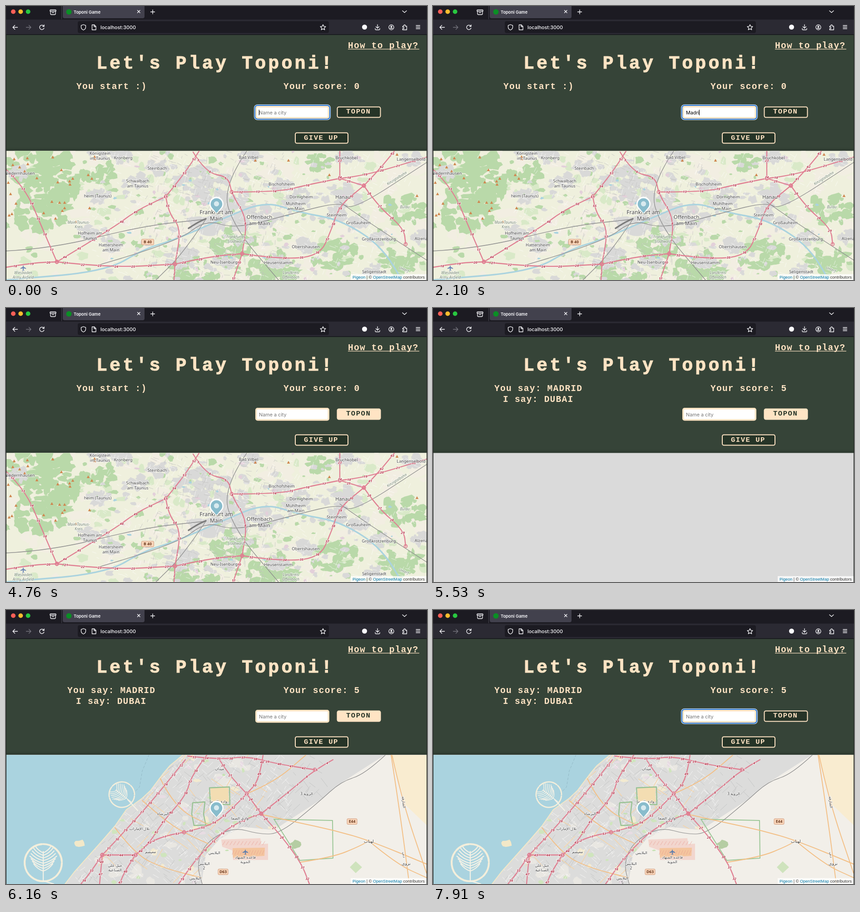
Recreate the animation shown at these times as an HTML page. Size 927 by 604 pixels, loop 8 s.

```html
<!DOCTYPE html>
<html lang="en">
<head>
<meta charset="utf-8">
<title>Toponi Game</title>
<style>
html, body { margin: 0; width: 100%; height: 100%; overflow: hidden; background: #1c1b22; }
svg { display: block; width: 927px; height: 604px; }
.px { font-family: "Liberation Mono", monospace; font-weight: 700; fill: #ffe4c4; white-space: pre; }
.p1 { font-size: 40px; letter-spacing: 5.1px; stroke: #ffe4c4; stroke-width: 1px; }
.p2 { font-size: 19.5px; letter-spacing: 1.25px; }
.p3 { font-size: 15.5px; letter-spacing: 1.55px; }
.ui { font-family: Inter, sans-serif; }
.lb { font-family: "Noto Sans", "DejaVu Sans", sans-serif; text-anchor: middle; fill: #444; stroke: #fff; stroke-opacity: .65; stroke-width: 2px; paint-order: stroke; }
.it { font-style: italic; fill: #70806d; }
.no { font-size: 7.8px; font-weight: 600; font-style: italic; fill: #b93a50; }
.ic { fill: none; stroke: #fbfbfe; stroke-width: 1.3; stroke-linecap: round; stroke-linejoin: round; }
.rd { fill: none; stroke-linejoin: round; stroke-linecap: round; }
</style>
</head>
<body>
<svg id="stage" viewBox="0 0 927 604"></svg>
<script>
const CREAM = [255, 228, 196], DARK = [38, 52, 39];
const PINK = '#e07f92', GREY = '#d9d9d8', GREEN = '#b9d9a9', SEA = '#aad3df';

let seed = 7;
const rnd = () => {
  seed = (seed + 0x6D2B79F5) | 0;
  let a = Math.imul(seed ^ (seed >>> 15), 1 | seed);
  a = (a + Math.imul(a ^ (a >>> 7), 61 | a)) ^ a;
  return ((a ^ (a >>> 14)) >>> 0) / 4294967296;
};
const span = (a, b) => a + rnd() * (b - a);
const times = (n, f) => Array.from({ length: n }, (_, i) => f(i)).join('');
const points = s => s.split(' ').map(p => p.split(',').map(Number));

// Smooth path through the midpoints of a polyline
function curve(p) {
  const last = p.length - 1;
  let d = 'M' + p[0];
  for (let i = 1; i < last; i++)
    d += `Q${p[i]} ${(p[i][0] + p[i + 1][0]) / 2},${(p[i][1] + p[i + 1][1]) / 2}`;
  return d + 'L' + p[last];
}
const line = (d, color, w, more = '') => `<path class="rd" d="${d}" stroke="${color}" stroke-width="${w}" ${more}/>`;
const way = (s, color, w) => line(curve(points(s)), color, w);
const motorways = list => list.map(s => {
  const p = points(s);
  const ends = [p[0], p[p.length - 1]].filter(([x, y]) => x > 0 && x < 926 && y > 330 && y < 600);
  return line(curve(p), PINK, 2.3, 'data-motorway=""')
    + ends.map(([x, y]) => `<circle cx="${x}" cy="${y}" r="3.5" fill="none" stroke="${PINK}" stroke-width="1.8"/>`).join('');
}).join('');

// Winding road that starts anywhere and drifts along its heading
function wander(steps, step) {
  let x = span(0, 927), y = span(320, 604), a = span(0, Math.PI * 2);
  return curve(Array.from({ length: steps }, () => {
    a += span(-.55, .55);
    return [(x += Math.cos(a) * step).toFixed(1), (y += Math.sin(a) * step).toFixed(1)];
  }));
}
const blob = (x, y, rx, ry, color) => {
  const n = 11;
  const p = Array.from({ length: n }, (_, i) => {
    const a = i / n * Math.PI * 2, r = span(.6, 1.2);
    return (x + Math.cos(a) * rx * r).toFixed(1) + ',' + (y + Math.sin(a) * ry * r).toFixed(1);
  });
  return `<polygon points="${p.join(' ')}" fill="${color}"/>`;
};
// Ragged patch built from small blobs around a centre
const patch = (x, y, r, color) => times(8 + r * .4, () => {
  const a = span(0, Math.PI * 2), d = r * Math.sqrt(rnd()) * .9;
  return blob(x + Math.cos(a) * d, y + Math.sin(a) * d * .65, span(4, 6 + r * .2), span(4, 5 + r * .14), color);
});
const scatter = (n, size, color, x0 = 0, x1 = 927) =>
  times(n, () => blob(span(x0, x1), span(320, 604), span(size / 3, size), span(size / 4, size * .7), color));
const streets = (n, x0, x1, len, tilt) => times(n, () => {
  const a = tilt + (rnd() < .5 ? Math.PI / 2 : 0) + span(-.25, .25), l = span(len / 3, len);
  return `M${span(x0, x1).toFixed(1)},${span(320, 604).toFixed(1)}l${(Math.cos(a) * l).toFixed(1)},${(Math.sin(a) * l).toFixed(1)}`;
});
const label = ([x, y, text, size = 9.2, cls = '', turn = 0]) => text.split('/').map((row, i) =>
  `<text class="lb ${cls}" x="${x}" y="${y + i * size * 1.2}" font-size="${size}" transform="rotate(${turn} ${x} ${y})">${row}</text>`).join('');
const shield = (x, y, w, text) => `<rect x="${x - w / 2}" y="${y - 6}" width="${w}" height="12.5" rx="2" fill="#f8d5b9" stroke="#c98c6c" stroke-width=".8"/>
  <text x="${x}" y="${y + 3.4}" font-family="Noto Sans, sans-serif" font-weight="600" font-size="8.6" text-anchor="middle" fill="#6e3c22">${text}</text>`;
const plane = (x, y, color) => `<path d="M${x},${y - 6}l1.2,4 5,3v1.4l-5,-1.2 -.4,3.4 1.5,1.2v.8l-2.3,-.5 -2.3,.5v-.8l1.5,-1.2 -.4,-3.4 -5,1.2v-1.4l5,-3z" fill="${color}"/>`;

function frankfurt() {
  const towns = [
    [207, 328, 'Königstein/im Taunus'], [258, 338, 'Kronberg'], [333, 361, 'Steinbach'], [534, 337, 'Bad Vilbel'],
    [750, 338, 'Bruchköbel'], [892, 341, 'Langenselbold'], [30, 372, 'Niedernhausen'], [290, 389, 'Schwalbach/am Taunus'],
    [202, 422, 'heim (Taunus)'], [185, 504, 'Hofheim am/Taunus'], [231, 530, 'Hattersheim/am Main'], [607, 396, 'Bischofsheim'],
    [650, 424, 'Dörnigheim'], [638, 439, 'Mühlheim/am-Main'], [728, 464, 'Steinheim'], [776, 481, 'Großauheim'],
    [821, 517, 'Großkrotzenburg'], [917, 516, 'Alzenau'], [660, 534, 'Obertshausen'], [600, 569, 'Heusenstamm'],
    [480, 568, 'Neu-Isenburg'], [811, 589, 'Seligenstadt'], [742, 425, 'Hanau', 10.8], [558, 469, 'Offenbach/am Main', 11.5],
    [463, 459, 'Frankfurt am/Main', 12]
  ];
  const regions = [
    [160, 480, 'Main-Taunus-/Kreis'], [878, 446, 'Bulau'], [506, 512, 'Frankfurter/Stadtwald'],
    [627, 591, 'Landkreis/Offenbach'], [38, 591, 'Wiesbaden/Army Airfield'],
    [862, 382, 'Kinzigtalbahn', -32], [875, 583, 'Unterf', 22]
  ];
  const reach = size => size > 11.5 ? 85 : size > 10 ? 46 : 25;
  return `<rect y="319" width="927" height="285" fill="#eff0dd"/>`
    + scatter(130, 24, '#f2eee2') + scatter(70, 18, '#d9e9c8')
    + points('70,350,80 95,400,85 70,455,70 195,365,45 410,585,55 505,525,58 585,585,65 720,548,55 870,450,56 870,560,55 690,345,30')
      .map(p => patch(...p, GREEN)).join('')
    + scatter(75, 13, GREEN)
    + towns.map(([x, y, , size]) => patch(x, y - 5, reach(size), GREY)).join('')
    + patch(430, 390, 65, GREY) + patch(390, 553, 38, GREY)
    + scatter(110, 11, GREY, 210, 800) + scatter(45, 7, GREEN, 230, 800) + scatter(24, 8, '#e3d0da', 230, 800)
    + line(streets(650, 180, 900, 14, .4), '#fff', .8, 'opacity=".75"')
    + line(streets(330, 300, 620, 14, .3), '#c0c0bf', .7)
    + line(times(34, () => wander(8, 22)), '#c1c0bb', .7)
    + way('870,604 840,540 742,472 645,455 570,430 475,470 370,516 305,535 220,585 0,604', SEA, 3.3)
    + scatter(14, 6, SEA, 200, 850)
    + line(times(42, () => wander(7, 20)), '#f5c692', 1.4)
    + ['200,572 375,522 440,470 505,492 640,455 735,432 765,450 926,345', '0,540 100,535 300,485 440,470', '735,432 800,478 926,560', '530,320 475,400 505,492 600,604', '440,470 390,545 330,604']
      .map(s => way(s, '#8d8d8d', 1.3)).join('')
    + way('402,490 420,478 440,469', '#7c7c7c', 3.5)
    + motorways([
      '0,360 42,400 80,490 112,564', '0,576 60,566 112,564', '112,564 230,577 372,569',
      '372,569 450,552 520,546', '520,546 600,558 690,552 716,495 734,440 788,396', '788,396 818,365 855,320',
      '112,564 235,490 285,452 352,420', '425,320 400,360 352,420', '352,420 357,455 386,490 372,569', '372,569 370,604',
      '412,322 440,368 490,376 497,415 532,470 520,546', '520,546 500,604', '497,410 600,410 660,395 735,380',
      '735,380 788,375 926,333', '735,320 735,380', '735,380 788,396', '788,396 818,440 876,490 880,525'
    ])
    + times(36, i => `<path d="M${span(4, i < 28 ? 200 : 920).toFixed()},${span(324, 475).toFixed()}l3.3,6h-6.6z" fill="#cf8750"/>`)
    + '<g class="numbers"></g>' + shield(312, 520, 27, 'B 40') + towns.map(label).join('')
    + regions.map(([x, y, text, turn]) => label([x, y, text, 8.2, 'it', turn])).join('')
    + plane(38, 577, '#6c87b5');
}

function palm(x, y, r, turn) {
  let d = `M0,${r}V${-r * .6}`;
  for (let i = 0; i < 8; i++) {
    const v = r * (.45 - i * .14), w = r * (.72 - Math.abs(i - 3) * .07);
    for (const k of [w, -w]) d += `M0,${v}Q${k * .6},${v - r * .1} ${k},${v - r * .38}`;
  }
  return `<g transform="translate(${x} ${y}) rotate(${turn})">${line(d, '#f3f1e6', r * .055)}
    <circle class="rd" r="${r}" stroke="#f3eedb" stroke-width="${r * .1}" stroke-dasharray="${r * 1.5} 3 ${r * .8} 3" transform="rotate(130)"/></g>`;
}

function dubai() {
  const coast = '390,319 361,343 345,362 318,398 300,415 265,440 240,476 215,505 150,578 130,604';
  const urban = `M${coast} 430,604 440,540 470,505 520,478 590,485 690,420 740,380 835,319Z`;
  const places = [
    [470, 353, 'ميدان'], [468, 425, 'وادي الصفا'], [346, 452, 'البرشاء'], [294, 485, 'تلال الإمارات'], [515, 462, 'وادي الصفا/5'],
    [662, 408, 'الروية 3'], [318, 536, 'معيصم'], [240, 566, 'جبل علي/الصناعية'], [459, 538, 'البلايس'], [436, 562, 'البلايس/2'],
    [417, 594, 'البلايس/5'], [527, 548, 'قاعدة المنهاد/الجوية'], [799, 513, 'لهباب', 9.5], [881, 562, 'نزوى', 9.5]
  ];
  return `<rect y="319" width="927" height="285" fill="#f2efe9"/>
    <path d="M848,319H927V475L880,430Z" fill="#f9ecd0"/>
    <clipPath id="urban"><path d="${urban}"/></clipPath><path d="${urban}" fill="#dcdcdb"/>
    <g clip-path="url(#urban)">`
    + scatter(28, 20, '#e9e7e2', 200, 560) + scatter(26, 9, '#cfe5bd', 230, 560)
    + scatter(14, 11, '#e8dce3', 200, 560) + scatter(12, 12, '#f3ead0', 320, 600)
    + line(streets(560, 150, 620, 20, -.85), '#fff', .8, 'opacity=".85"')
    + line(streets(330, 150, 700, 24, -.85), '#b9bbbb', .7)
    + line(streets(50, 180, 620, 60, -.85), '#fad39e', 1.2)
    + `</g><path d="M0,319L${coast} 0,604Z" fill="${SEA}"/>`
    + line('M' + coast, '#f3e8c8', 2)
    + blob(162, 515, 15, 9, '#f3e8c8')
    + line('M315,319L300,355 294,390 280,405', '#8eb3c0', .8, 'stroke-dasharray="5 4"')
    + palm(255, 407, 28, -52) + palm(82, 557, 41, 0)
    + line('M268,418L290,442M82,597L105,604', '#f3f1e6', 2.5)
    + `<path d="M450,393L489,390 491,422 470,430 452,422Z" fill="#f3ddb2"/>`
    + line('M448,392L492,390 493,429 450,428ZM411,425L438,423 435,450 440,474 414,475 409,450Z', '#98c293', 2.3)
    + scatter(6, 6, '#c5e2b2', 412, 490)
    + line('M590,461L719,464 720,547 647,552Z', '#9cc797', 2)
    + blob(638, 518, 12, 10, '#b5cda3') + `<path d="M757,567l13,-13 14,13 -14,13z" fill="#cfe3bd"/>`
    + `<path d="M474,506L560,503 562,516 577,515 577,551 500,551 498,530 476,522Z" fill="#f3c9c0" opacity=".65"/>
    <path d="M499,525L570,524 569,542 500,546Z" fill="#f5bf8e" opacity=".75"/>`
    + line(times(12, i => `M${482 + i * 8},510l-5,8M${502 + i * 6},530l-4,9`), '#e79d93', .7)
    + way('835,320 790,362 738,378 690,422 605,492 560,495 500,478 440,512 420,560 432,604', '#8d8d8d', 1.2)
    + line(times(9, () => wander(9, 26)), '#d3cfc8', .7)
    + ['848,320 868,450 888,604', '850,320 872,420 926,580', '560,450 640,468 720,485 800,508 926,560', '648,556 720,545 780,520 800,508', '800,510 860,560 926,590', '530,405 590,380 660,320', '300,420 345,460 390,490 445,515', '240,480 285,540 350,570 430,590', '340,372 372,437 450,475']
      .map(s => way(s, '#f3bf85', 1.9)).join('')
    + motorways([
      '395,330 330,412 250,500 212,540', '212,540 185,580 165,604', '442,320 408,365 397,408 345,467 315,515 285,540', '285,540 262,575 250,604',
      '566,320 558,375 530,405', '530,405 490,447 450,475 392,490', '392,490 330,500 285,540', '720,330 680,352 630,395 562,449', '562,449 500,468 425,540 380,604',
      '470,330 490,362 530,405', '530,405 562,449', '562,449 600,490 650,557 668,604', '400,322 470,330 530,322 600,340 680,352', '212,540 285,540', '212,540 206,604'
    ])
    + '<g class="numbers"></g>' + shield(762, 466, 22, 'E44') + shield(478, 577, 22, 'D63') + plane(527, 533, '#5f7fae')
    + places.map(([x, y, text, size = 8.5]) => label([x, y, text, size])).join('')
    + label([873, 424, 'الشارقة', 8, '', 84]) + label([874, 540, 'دبي', 8, '', 84]);
}

// Junction numbers, evenly spaced along each motorway
function numberRoads(map, first, gap) {
  let n = first, out = '';
  map.querySelectorAll('[data-motorway]').forEach(road => {
    const length = road.getTotalLength();
    for (let s = gap * .55; s < length; s += gap) {
      const p = road.getPointAtLength(s);
      out += `<text class="lb no" x="${p.x}" y="${p.y + 3}">${n}</text>`;
      n = n % 57 + 1;
    }
  });
  map.querySelector('.numbers').innerHTML = out;
}

function chrome() {
  const icons = [
    'M98,8.5h11a1,1 0 0 1 1,1v2h-13v-2a1,1 0 0 1 1,-1zM98,12v5a2,2 0 0 0 2,2h7a2,2 0 0 0 2,-2v-5M101.5,14.5h4',
    'M289.5,9.5l5.5,5.500M295,9.5l-5.5,5.5M318.5,13h9M323,8.5v9M873,10.5l4.5,4 4.5,-4',
    'M25.5,47h-10M19.5,42.5l-4.5,4.5 4.5,4.5M83,44a5,5 0 1 0 .8,4.5M84,41.5v3.5h-3.5',
    'M170.5,41l5,1.8v3.7q0,4.5 -5,6.5q-5,-2 -5,-6.5v-3.7z',
    'M189.5,41.5h5l3.5,3.5v7.5h-8.5zM194,41.5v4h4',
    'M698,41l1.8,3.9 4.2,.5 -3.1,2.9 .8,4.2 -3.7,-2.1 -3.7,2.1 .8,-4.2 -3.1,-2.9 4.2,-.5z',
    'M818,41v7.5M814.5,45.5l3.5,3.5 3.5,-3.5M813,49.5v1.5a1.5,1.5 0 0 0 1.5,1.5h7a1.5,1.5 0 0 0 1.5,-1.5v-1.5',
    'M873.5,44.5h2.5v-1.5a1.7,1.7 0 0 1 3.4,0v1.5h3v8h-9v-2.5h1.3a1.6,1.6 0 0 0 0,-3.2h-1.3z',
    'M903,43h8.5M903,46.5h8.5M903,50h8.5'
  ];
  const lights = ['#ff5f57', '#febc2e', '#28c840'].map((c, i) => `<circle cx="${16 + i * 16.3}" cy="12.5" r="5" fill="${c}"/>`).join('');
  return `<rect width="927" height="31" fill="#1c1b22"/><rect y="30" width="927" height="33" fill="#2b2a33"/>
    <rect y="62.5" width="927" height="1.2" fill="#0e0e13"/>${lights}
    <path d="M122.5,0V29" stroke="#45444d"/><rect x="125" y="-4" width="180" height="31" rx="4" fill="#42414d"/>
    <circle cx="138.5" cy="13" r="6" fill="#0b8e25"/>
    <text class="ui" x="149" y="16.5" font-size="9.3" font-weight="600" fill="#fbfbfe">Toponi Game</text>
    <rect x="158" y="33.5" width="553" height="26" rx="4" fill="#1c1b22"/>
    <text class="ui" x="208" y="51" font-size="10.8" font-weight="500" fill="#fbfbfe">localhost:3000</text>
    <path class="ic" d="${icons.join('')}"/>
    <path class="ic" d="M44.5,47h10M50.5,42.5l4.5,4.5 -4.5,4.5" style="stroke:#75747d"/>
    <circle cx="789.5" cy="46.5" r="5.5" fill="#fbfbfe"/>
    <circle class="ic" cx="848.5" cy="47" r="5.5"/><circle cx="848.5" cy="45.5" r="2" fill="#fbfbfe"/><path d="M844.7,50a4,3 0 0 1 7.6,0z" fill="#fbfbfe"/>`;
}

const pixel = (x, y, size, text, id = '') => `<text class="px p${size}" x="${x}" y="${y}" ${id && `id="${id}"`}>${text}</text>`;
const button = (x, y, w, id) => `<rect id="${id}" x="${x}" y="${y}" width="${w}" height="23" rx="3.5" fill="rgb(${DARK})" stroke="rgb(${CREAM})" stroke-width="2"/>`;
// Rounded frame grown outwards from the text field
const halo = (grow, color) => `<rect x="${549 - grow}" y="${220 - grow}" width="${163 + grow * 2}" height="${28.5 + grow * 2}" rx="${5 + grow}" fill="${color}"/>`;

const stage = document.getElementById('stage');
stage.innerHTML = `
  <defs><linearGradient id="fade" x2="0" y2="1"><stop stop-color="#000" stop-opacity="0"/><stop offset="1" stop-color="#000" stop-opacity=".18"/></linearGradient>
  <clipPath id="frame"><rect y="319.5" width="927" height="285"/></clipPath></defs>
  <rect width="927" height="604" fill="#364438"/>
  ${chrome()}
  <rect y="311" width="927" height="9" fill="url(#fade)"/>
  ${pixel(753, 93, 2, 'How to play?')}<rect x="753" y="94.5" width="157" height="1.2" fill="#ffe4c4"/>
  ${pixel(199, 138, 1, "Let's Play Toponi!")}
  ${pixel(155, 183, 2, '', 'said')}${pixel(154, 207, 2, '', 'reply')}${pixel(611, 183, 2, '', 'score')}
  <g id="ring">${halo(3, '#e9f1f8')}${halo(2, '#1a6fd6')}</g>
  ${halo(0, '#ffe4c4')}${halo(-3.5, '#fff')}
  <text class="ui" id="field" x="557" y="238.6" font-size="10.8"></text>
  <rect id="caret" y="228.5" width="1" height="12.5" fill="#000"/>
  ${button(729.5, 222.5, 95, 'button')}${pixel(749, 237, 3, 'TOPON', 'action')}
  ${button(637, 279.5, 116, 'quit')}${pixel(656, 295, 3, 'GIVE UP')}
  <g clip-path="url(#frame)">
    <rect y="319" width="927" height="285" fill="#dadada"/>
    <g id="first">${frankfurt()}</g><g id="second">${dubai()}</g>
    <g id="pin"><path d="M463.5,457.5L452,446.5A15.5,15.5 0 1 1 475,446.5Z" fill="#fff"/>
      <path d="M463.5,456.5L453.5,444.5A12.8,12.8 0 1 1 473.5,444.5Z" fill="#88bccc"/><circle cx="463.5" cy="436" r="5.7" fill="#d8eaef"/></g>
    <rect x="759" y="591" width="168" height="13" fill="#fff" opacity=".75"/>
    <text x="763" y="601" font-family="Liberation Sans, sans-serif" font-size="9.08" fill="#333"><tspan fill="#0078a8">Pigeon</tspan> | © <tspan fill="#0078a8">OpenStreetMap</tspan> contributors</text>
  </g>
  <path d="M.5,63V604M926.5,63V604" stroke="#1a211c"/>`;

const el = {};
stage.querySelectorAll('[id]').forEach(e => el[e.id] = e);
numberRoads(el.first, 12, 37);
numberRoads(el.second, 22, 27);

const show = (e, on) => e.setAttribute('visibility', on ? 'visible' : 'hidden');
const write = (e, text) => { if (e.textContent !== text) e.textContent = text; };
const ramp = (t, from) => Math.min(1, Math.max(0, (t - from) / 435)) ** 1.75;
const mix = (a, b, p) => `rgb(${a.map((v, i) => Math.round(v + (b[i] - v) * p))})`;

const KEYS = [910, 1260, 1400, 1890, 2030, 2590];
const BLUR = 4620, CLEAR = 4690, ANSWER = 5530, LOADED = 5600, FOCUS = 7210;
const BLINK = 630;

function draw(t) {
  const typed = t < CLEAR ? 'Madrid'.slice(0, KEYS.filter(k => t >= k).length) : '';
  const focused = t < BLUR || t >= FOCUS;
  const woken = [-490, ...KEYS, FOCUS + 70].filter(k => t >= k).pop();
  const answered = t >= ANSWER, loaded = t >= LOADED;

  write(el.field, typed || 'Name a city');
  el.field.setAttribute('fill', typed ? '#000' : '#757575');
  el.caret.setAttribute('x', 556.7 + (typed ? el.field.getComputedTextLength() : 0));
  show(el.caret, focused && Math.floor((t - woken) / BLINK) % 2 === 0);
  show(el.ring, focused);

  const hover = ramp(t, 3840) - ramp(t, 6640);
  el.button.setAttribute('fill', mix(DARK, CREAM, hover));
  el.action.style.fill = mix(CREAM, DARK, hover);

  write(el.said, answered ? 'You say: MADRID' : 'You start :)');
  el.said.setAttribute('x', answered ? 135 : 155);
  write(el.reply, answered ? 'I say: DUBAI' : '');
  write(el.score, 'Your score: ' + (answered ? 5 : 0));
  show(el.first, !answered);
  show(el.second, loaded);
  show(el.pin, !answered || loaded);
}

const start = performance.now();
function tick() {
  draw((performance.now() - start) % 8000);
  requestAnimationFrame(tick);
}
tick();
</script>
</body>
</html>
```
